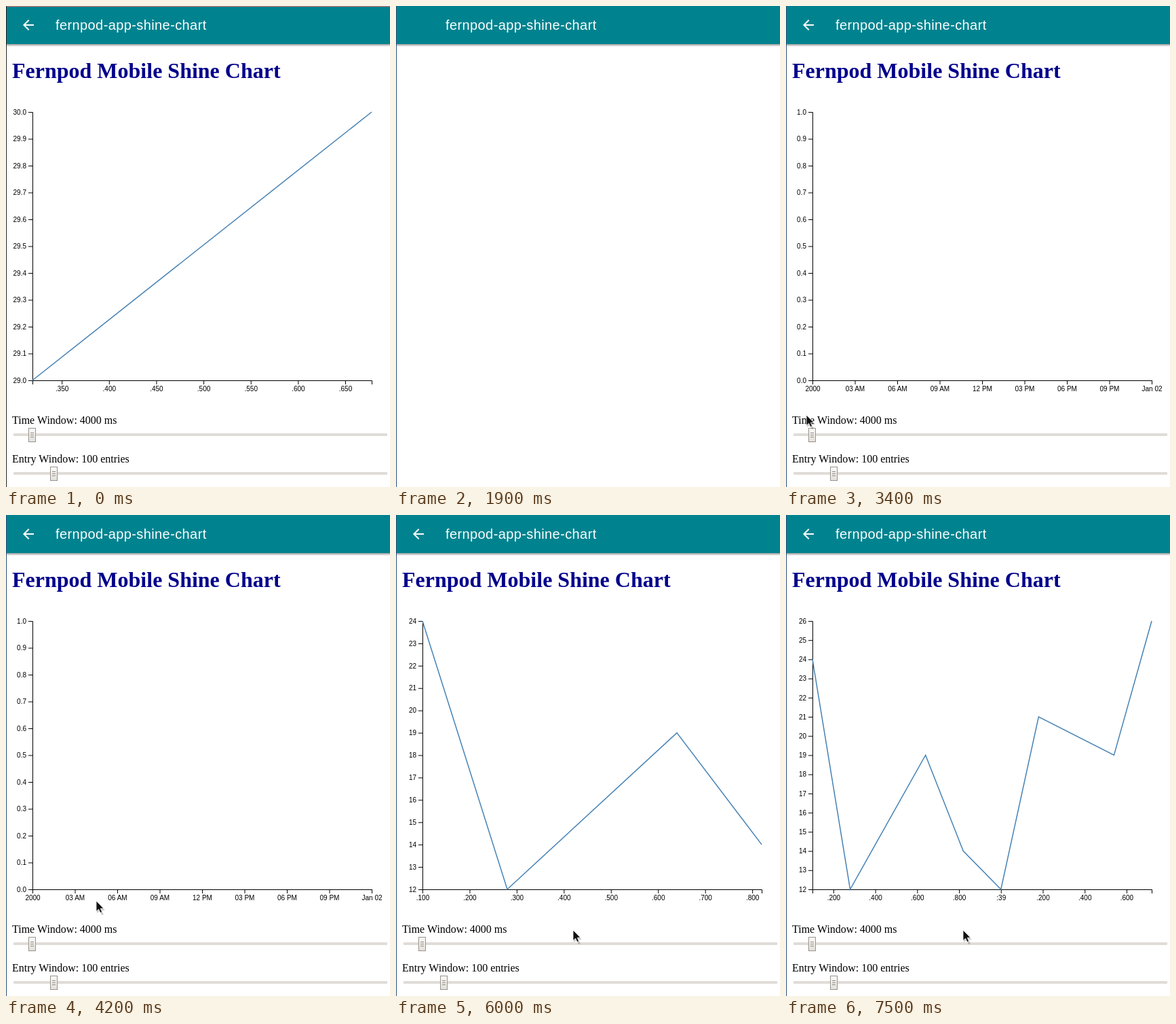
An HTML page for the animation above (8000 ms loop, 566 px wide and 708 px high).

```html
<!DOCTYPE html>
<html lang="en">
<head>
<meta charset="utf-8">
<title>Light sensor chart</title>
<style>
  html, body { margin: 0; width: 100%; height: 100%; overflow: hidden; background: #fff; }
  svg { display: block; }
  .bar { font: 20px "Liberation Sans", Arial, sans-serif; letter-spacing: .02em; fill: #fff; }
  .head { font: bold 32px "Liberation Serif", "Times New Roman", serif; fill: #00008b; }
  .label { font: 16px "Liberation Serif", "Times New Roman", serif; }
  #chart { font: 10px "Liberation Sans", Arial, sans-serif; }
  #chart path { fill: none; stroke: #000; }
  #chart .line { stroke: steelblue; stroke-width: 1.5; }
  .left { text-anchor: end; }
  .below { text-anchor: middle; }
</style>
</head>
<body>
<svg width="566" height="708" viewBox="0 0 566 708">
  <defs>
    <linearGradient id="shade" x2="0" y2="1">
      <stop stop-color="#000" stop-opacity=".4"/>
      <stop offset="1" stop-color="#000" stop-opacity="0"/>
    </linearGradient>
    <linearGradient id="knob" x2="0" y2="1">
      <stop stop-color="#fbfaf9"/>
      <stop offset="1" stop-color="#e3dfda"/>
    </linearGradient>
    <g id="thumb">
      <rect x=".5" y=".5" width="10" height="20" fill="url(#knob)" stroke="#98938c"/>
      <path d="M3 7.5h5M3 10.5h5M3 13.5h5" stroke="#8d8881"/>
    </g>
  </defs>

  <rect y="56" width="566" height="4" fill="url(#shade)"/>
  <rect width="566" height="56" fill="#00838f"/>
  <text class="bar" x="73" y="35">fernpod-app-shine-chart</text>
  <rect id="topEdge" x="1" width="565" height="1" fill="#e0706c"/>
  <rect id="sideEdge" width="1" height="708"/>

  <g id="page">
    <path transform="translate(21 16)" fill="#fff"
      d="M20 11H7.83l5.59-5.59L12 4l-8 8 8 8 1.41-1.41L7.83 13H20z"/>
    <text class="head" x="9" y="106">Fernpod Mobile Shine Chart</text>
    <g id="chart" transform="translate(39 156)"></g>
    <text class="label" x="9" y="615">Time Window: 4000 ms</text>
    <rect x="11" y="629" width="551" height="4" rx="1" fill="#e0dcd8"/>
    <use href="#thumb" x="33" y="621"/>
    <text class="label" x="9" y="672">Entry Window: 100 entries</text>
    <rect x="11" y="686" width="551" height="4" rx="1" fill="#e0dcd8"/>
    <use href="#thumb" x="65" y="678"/>
  </g>

  <g id="cursor">
    <path d="M1 2v16l4-3 3 6 3-1-3-6h5z" fill="#000" opacity=".2"/>
    <path d="M0 0V15.5L3.6 12.2 6 17.6 8.6 16.5 6.3 11.2H11Z" fill="#111" stroke="#fff" stroke-width=".8"/>
  </g>
</svg>
<script>
const LOOP = 8000, W = 500, H = 395;
const $ = id => document.getElementById(id);

// Readings: [time shown, sensor time in ms, value]
const before = [[0, 319, 29], [0, 678, 30], [100, 858, 29]];
const after = [
  [4800, 100, 24], [5300, 280, 12], [5700, 640, 19], [6000, 820, 14],
  [6200, 1000, 12], [6400, 1180, 21], [6900, 1540, 19], [7500, 1720, 26]
];
const dayLabels = ["2000", "03 AM", "06 AM", "09 AM", "12 PM", "03 PM", "06 PM", "09 PM", "Jan 02"];

// Pointer path: [time, x, y]
const route = [
  [2300, 160, 702], [2700, 129, 645], [3000, 94, 631], [3400, 30, 602], [3600, 3, 598],
  [3900, 49, 606], [4200, 133, 568], [4400, 259, 610], [4500, 259, 610], [4600, 261, 611]
];

// Round tick values (1, 2 or 5 times a power of ten), about ten of them
function ticks(lo, hi) {
  if (lo === hi) return [lo];
  const raw = (hi - lo) / 10;
  const power = 10 ** Math.floor(Math.log10(raw) + 1e-9);
  const ratio = raw / power;
  const step = power * (ratio >= Math.sqrt(50) ? 10 : ratio >= Math.sqrt(10) ? 5 : ratio >= Math.SQRT2 ? 2 : 1);
  const list = [];
  for (let i = Math.ceil(lo / step - 1e-6); i * step <= hi + 1e-6; i++) list.push(i * step);
  return list;
}

const scale = (lo, hi, from, to) => v => hi === lo ? from : from + (v - lo) / (hi - lo) * (to - from);
const extent = list => [Math.min(...list), Math.max(...list)];

const xTick = (x, text) =>
  `<path d="M${x + .5} ${H}v6"/><text class="below" x="${x + .5}" y="${H + 16.1}">${text}</text>`;
const yTick = (y, text) =>
  `<path d="M0 ${y + .5}h-6"/><text class="left" x="-9" y="${y + 3.7}">${text}</text>`;

function timeLabel(ms) {
  ms = Math.round(ms);
  return ms % 1000 ? "." + String(ms % 1000).padStart(3, "0") : ":" + (38 + ms / 1000);
}

function chart(data) {
  const times = data.map(d => d[1]), values = data.map(d => d[2]);
  const [t0, t1] = data.length ? extent(times) : [0, 1];
  const [v0, v1] = data.length ? extent(values) : [0, 1];
  const x = scale(t0, t1, 0, W), y = scale(v0, v1, H, 0);
  const digits = v1 - v0 === 1 ? 1 : 0;
  let out = `<path d="M-6 ${H + .5}H.5V.5H-6M.5 ${H + 6}V${H + .5}H${W + .5}V${H + 6}"/>`;
  out += ticks(v0, v1).map(v => yTick(y(v), v.toFixed(digits))).join("");
  out += data.length
    ? ticks(t0, t1).map(t => xTick(x(t), timeLabel(t))).join("")
    : dayLabels.map((text, i) => xTick(i * W / 8, text)).join("");
  if (data.length > 1)
    out += `<path class="line" d="M${data.map(d => x(d[1]) + " " + y(d[2])).join("L")}"/>`;
  return out;
}

function pointer(t) {
  const i = route.findIndex(k => k[0] > t);
  if (i < 0) return route[route.length - 1].slice(1);
  const [ta, xa, ya] = route[i - 1], [tb, xb, yb] = route[i];
  const p = (t - ta) / (tb - ta);
  return [Math.round(xa + (xb - xa) * p), Math.round(ya + (yb - ya) * p)];
}

const show = (id, on) => $(id).setAttribute("visibility", on ? "visible" : "hidden");
let last = -1;

function draw() {
  const t = Math.floor(performance.now() % LOOP / 100) * 100;
  if (t !== last) {
    last = t;
    show("topEdge", t < 100);
    $("sideEdge").setAttribute("fill", t < 500 ? "#222" : "#2b4f7c");
    show("page", t < 1900 || t >= 2200);
    $("chart").innerHTML = chart((t < 1900 ? before : after).filter(d => d[0] <= t));
    const moving = t >= route[0][0];
    show("cursor", moving);
    if (moving) $("cursor").setAttribute("transform", `translate(${pointer(t)})`);
  }
  requestAnimationFrame(draw);
}
draw();
</script>
</body>
</html>
```
